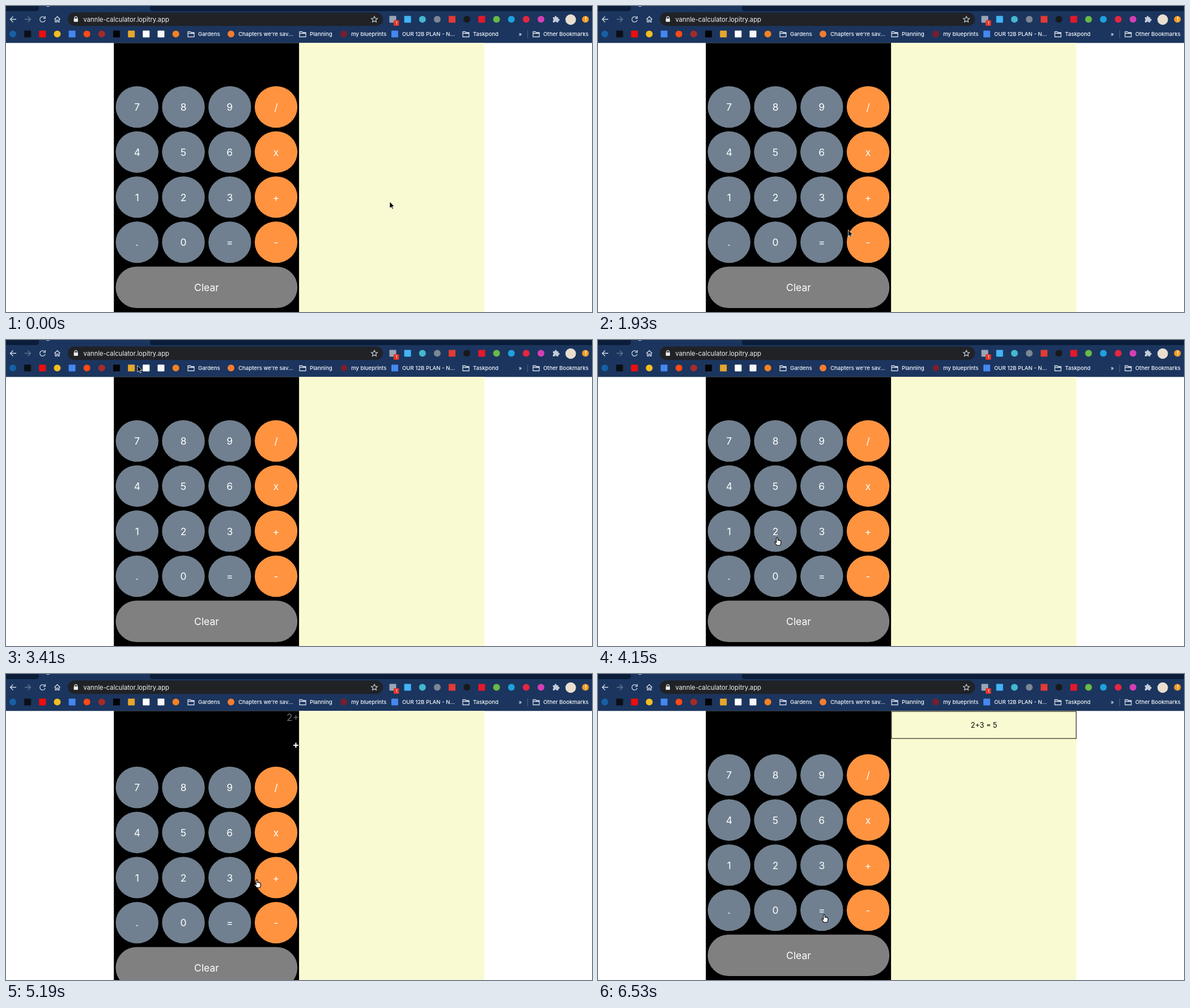
Recreate the animation shown at these times as an HTML page. Size 1034 px wide and 541 px high, loop 8000 ms.

```html
<!DOCTYPE html>
<html lang="en">
<head>
<meta charset="utf-8">
<title>Calculator</title>
<style>
  html, body { margin: 0; width: 100%; height: 100%; overflow: hidden; background: #fff; }
  svg { display: block; width: 100vw; height: 100vh; font-family: Inter, sans-serif; }
  .line { fill: none; stroke: #d5dbe6; stroke-width: 1.3; }
  .mark { font-size: 9.6px; font-weight: 500; fill: #f4f6fa; }
  .key { font-size: 17.5px; fill: #fff; text-anchor: middle; }
  .out { font-size: 17.5px; text-anchor: end; }
</style>
</head>
<body>
<svg viewBox="0 0 1034 541">
  <rect width="1034" height="65.3" fill="#1b355e"/>
  <path d="M0 0H58V4Q58 9 53 9H0ZM254 0H1034V9H259Q254 9 254 4Z" fill="#0b1d38"/>
  <circle cx="74" cy="-3.5" r="5" fill="#a9b5c8"/>
  <rect x="109" y="11.5" width="556" height="23.8" rx="11.9" fill="#202226"/>
  <g class="line">
    <path id="back" d="M18 23.5H7.5M12.5 18.5L7.5 23.5L12.5 28.5"/>
    <use href="#back" transform="matrix(-1 0 0 1 51 0)" opacity=".4"/>
    <path d="M68.3 20.5A4.8 4.8 0 1 0 69.2 25M69.3 18V21.8H65.5"/>
    <path d="M85.5 23.5L90.5 18.7L95.5 23.5M87 22.5V28.3H89.3V24.8H91.7V28.3H94V22.5"/>
    <path d="M121 22.5V21A2.3 2.3 0 0 1 125.6 21V22.5"/>
    <path d="M650 18.3L651.6 21.8L655.4 22.2L652.6 24.7L653.4 28.5L650 26.5L646.6 28.5L647.4 24.7L644.6 22.2L648.4 21.8Z" stroke-width="1.1"/>
  </g>
  <rect x="119.6" y="22" width="7.4" height="6" rx="1" fill="#e8eaed"/>
  <text x="136.5" y="27.6" font-size="11.25" fill="#f1f3f4">vannle-calculator.lopitry.app</text>
  <g id="bar"></g>
  <path d="M965 20H968.2A1.8 1.8 0 1 1 971.6 20H974.5V22.8A1.8 1.8 0 1 1 974.5 26.2V29H971.5A1.8 1.8 0 0 0 968 29H965V26A1.8 1.8 0 0 0 965 22.6Z" fill="#c3cbd9"/>
  <rect x="684" y="25" width="9.5" height="10" rx="1.5" fill="#e53528"/>
  <text x="687.3" y="33" font-size="8" fill="#fff">1</text>
  <text x="1021.2" y="27.4" font-size="10" font-weight="700" fill="#fff">!</text>
  <text x="904.5" y="53" class="mark">»</text>
  <path d="M920.5 43V57" stroke="#506686"/>

  <rect x="190.3" y="65.3" width="327" height="476"/>
  <rect x="517.3" y="65.3" width="327" height="476" fill="#fafad2"/>
  <text id="formula" class="out" x="517.3" y="83.3" fill="#6e6e6e"></text>
  <text id="entry" class="out" x="517.3" y="130.5" fill="#fff" font-weight="700"></text>
  <g id="pad"></g>
  <g id="history">
    <rect x="517.8" y="66.2" width="326" height="47.8" fill="none" stroke="#000"/>
    <text x="681" y="94.7" font-size="12.6" text-anchor="middle">2+3 = 5</text>
  </g>
  <path id="arrow" d="M0 0V11.6L2.7 9.2L4.5 13.2L6.4 12.4L4.7 8.5H8.3Z" stroke="#fff" stroke-width=".8"/>
  <path id="hand" d="M-1.3 1.2Q0 -.8 1.3 1.2V5Q2.5 4 3.6 5.4Q5 4.6 5.6 6Q7 6 6.8 8V10Q6.5 12 5.5 14H-.5Q-2.5 11.5 -4 9Q-4.3 7 -2.5 7.8L-1.3 9Z" fill="#fff" stroke="#000" stroke-width="1.1"/>
</svg>
<script>
const el = id => document.getElementById(id);

// Evenly spaced icons; a leading "s" makes a square, otherwise a circle
const PITCH = 26.15;
const icon = (x, y, color, r = 6) => color[0] == 's'
  ? `<rect x="${x - r}" y="${y - r}" width="${2 * r}" height="${2 * r}" rx="1" fill="${color.slice(1)}"/>`
  : `<circle cx="${x}" cy="${y}" r="${r}" fill="${color}"/>`;
const row = (x, y, colors) =>
  colors.split(' ').map((color, i) => icon(x + i * PITCH, y, color)).join('');

const folder = x =>
  `<path class="line" d="M${x - 5.5} 45.5h4.5l1.5 1.5h5v7.5h-11zm0 3h11"/>`;
const bookmark = (x, text, color) =>
  (color ? icon(x - 13, 49.5, color) : folder(x - 12.5)) +
  `<text class="mark" x="${x}" y="53.2">${text}</text>`;

el('bar').innerHTML =
  row(682.5, 23.5, 's#9aa5b5 s#42b4f5 #43b8cf #7d8794 s#e33a34 #17191d s#e3182b #68b946 #1fa0dd #e5263f #d53fb4 none #e9dfd0 #f29a22') +
  row(12, 49.5, '#1660a5 s#0c0f14 s#f00d0d #f3bd22 s#4587f0 #fb4a14 #a62b2b s#050505 s#e5a72e s#fff s#f4f6f8 #f58220') +
  icon(996.4, 24, '#e9dfd0', 9.3) +
  bookmark(339, 'Gardens') +
  bookmark(410, "Chapters we're sav...", '#f47c32') +
  bookmark(536, 'Planning') +
  bookmark(609, 'my blueprints', '#76202f') +
  bookmark(699, 'OUR 12B PLAN - N...', 's#4587f0') +
  bookmark(824, 'Taskpond') +
  bookmark(948, 'Other Bookmarks');

const keys = [...'789/456x123+.0=-'].map((sign, i) => ({
  sign, x: 231.3 + i % 4 * 81.75, y: 178.5 + (i >> 2) * 79.7
}));
el('pad').innerHTML = keys.map(({ sign, x, y }, i) =>
  `<ellipse cx="${x}" cy="${y}" rx="37.7" ry="36.7" fill="${i % 4 == 3 ? '#ff9340' : '#708090'}"/>
   <text class="key" x="${x}" y="${y + 6.6}">${sign}</text>`).join('') +
  `<rect x="193.6" y="460.7" width="320.6" height="73.4" rx="36.7" fill="#808080"/>
   <text class="key" x="354" y="503.8">Clear</text>`;

const STEP = 148;
const stops = [
  [0, 677, 346], [2, 652, 337], [6, 652, 337], [7, 617, 321],
  [10, 370, 217], [12, 385, 419], [15, 603, 330], [18, 570, 279], [23, 232, 45],
  [28, 316, 349], [29, 326, 349], [30, 415, 363], [32, 460, 365], [34, 460, 365],
  [37, 393, 360], [38, 393, 360], [40, 397, 425], [42, 397, 425], [44, 399, 425]
];
const typed = [29, 34, 38], solved = 42;

function pointer(step) {
  const next = stops.findIndex(stop => stop[0] > step);
  if (next < 0) return stops.at(-1).slice(1);
  const [from, x, y] = stops[next - 1], [to, x2, y2] = stops[next];
  const p = (step - from) / (to - from), ease = p * p * (3 - 2 * p);
  return [x + (x2 - x) * ease, y + (y2 - y) * ease];
}

function draw() {
  const step = Math.floor(performance.now() % 8000 / STEP);
  const [x, y] = pointer(step);
  const done = step >= solved;
  const formula = done ? '' : '2+3'.slice(0, typed.filter(at => at <= step).length);
  const shift = formula ? 22 : 0;
  const overKey = keys.some(k => Math.hypot((x - k.x) / 37.7, (y - k.y - shift) / 36.7) < 1);

  el('formula').textContent = formula;
  el('entry').textContent = formula.slice(-1);
  el('pad').setAttribute('transform', `translate(0 ${shift})`);
  el('history').style.display = done ? '' : 'none';
  for (const [id, shown] of [['hand', overKey], ['arrow', !overKey]]) {
    el(id).setAttribute('transform', `translate(${x} ${y})`);
    el(id).style.display = shown ? '' : 'none';
  }
  requestAnimationFrame(draw);
}
draw();
</script>
</body>
</html>
```
